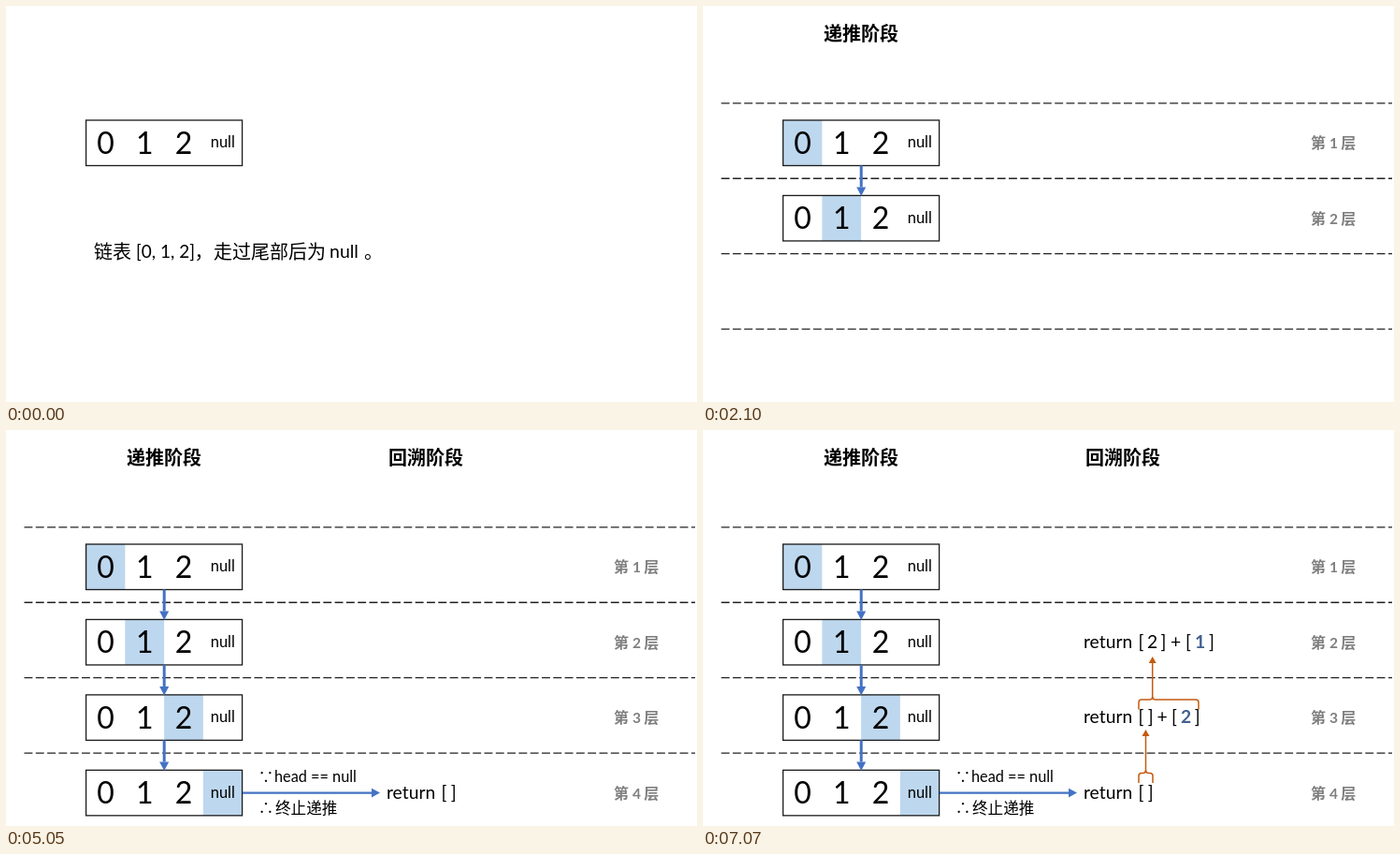
Animation, 739 px wide and 423 px high, one loop 8000 ms. Source, as an HTML page:

```html
<!DOCTYPE html>
<html lang="zh-CN">
<head>
<meta charset="utf-8">
<style>
  html, body { margin: 0; width: 100%; height: 100%; overflow: hidden; background: #fff; }
  svg { display: block; width: 739px; height: 423px; }
  text { font-family: Lato, "Noto Sans CJK SC", "Noto Sans CJK", sans-serif; white-space: pre; }
  .mid { text-anchor: middle; }
  .bold { font-weight: 700; }
</style>
</head>
<body>
<svg id="stage" viewBox="0 0 739 423"></svg>
<script>
const LOOP = 8000;
const PITCH = 80.45;
const BLUE = '#4472c4', ORANGE = '#c55a11', CELL = '#bdd7ee', INK = '#000';
const stage = document.getElementById('stage');
const scenes = [];

function add(parent, tag, attrs, content) {
  const el = document.createElementNS('http://www.w3.org/2000/svg', tag);
  for (const key in attrs) el.setAttribute(key, attrs[key]);
  if (content) el.textContent = content;
  parent.appendChild(el);
  return el;
}

// A group visible from start until end within the loop.
function scene(start, end = LOOP) {
  const el = add(stage, 'g', {});
  scenes.push({ el, start, end });
  return el;
}

function text(g, x, y, size, content, cls = '', fill = INK) {
  add(g, 'text', { x, y, 'font-size': size, class: cls, fill }, content);
}

function line(g, x1, y1, x2, y2, stroke, width, dash = 'none') {
  add(g, 'line', { x1, y1, x2, y2, stroke, 'stroke-width': width, 'stroke-dasharray': dash });
}

function arrow(g, x1, y1, x2, y2, color, width, length, half) {
  const span = Math.hypot(x2 - x1, y2 - y1);
  const dx = (x2 - x1) / span, dy = (y2 - y1) / span;
  const bx = x2 - dx * length, by = y2 - dy * length;
  line(g, x1, y1, bx, by, color, width);
  add(g, 'path', {
    d: `M${x2},${y2} L${bx - dy * half},${by + dx * half} L${bx + dy * half},${by - dx * half} Z`,
    fill: color
  });
}

function brace(g, left, right, peak, top, bottom) {
  const r = Math.min(3, (peak - left) / 2.5);
  add(g, 'path', {
    d: `M${left},${bottom} V${top + r} Q${left},${top} ${left + r},${top} H${peak - r}
        Q${peak},${top} ${peak},${top - r} Q${peak},${top} ${peak + r},${top}
        H${right - r} Q${right},${top} ${right},${top + r} V${bottom}`,
    fill: 'none', stroke: ORANGE, 'stroke-width': 1.5
  });
}

function highlight(g, row) {
  add(g, 'rect', { x: 85.6 + row * 41.75, y: 122 + row * PITCH, width: 41.75, height: 48.5, fill: CELL });
}

function listBox(g, row) {
  const y = row * PITCH;
  add(g, 'rect', {
    x: 85.6, y: 122 + y, width: 167, height: 48.5,
    fill: 'none', stroke: '#1a1a1a', 'stroke-width': 1.3
  });
  ['0', '1', '2'].forEach((d, i) => text(g, 106.6 + i * 41.7, 158 + y, 32, d, 'mid'));
  text(g, 231.8, 151.3 + y, 16.5, 'null', 'mid');
}

function label(g, row) {
  const y = 152.3 + row * PITCH;
  text(g, 658, y, 16, '第', 'mid bold', '#7f7f7f');
  text(g, 674.5, y, 15.5, String(row + 1), 'mid bold', '#7f7f7f');
  text(g, 690.3, y, 16, '层', 'mid bold', '#7f7f7f');
}

function descend(g, row) {
  const y = 122 + row * PITCH;
  arrow(g, 169.2, y - 32, 169.2, y + 0.6, BLUE, 3, 9.5, 5);
}

// Parts alternate between a symbol and its centre.
function result(g, row, parts, fresh) {
  const y = 152.5 + row * PITCH;
  text(g, 407, y, 19.3, 'return');
  for (const [symbol, x] of parts) text(g, x, y, 19.3, symbol, 'mid');
  if (fresh) text(g, fresh[1], y, 19.3, fresh[0], 'mid bold', '#42608f');
}

const intro = scene(0, 1090);
text(intro, 94, 270, 20, '链表');
text(intro, 139, 269, 19, '[0, 1, 2]');
text(intro, 201.5, 270, 20, '，');
text(intro, 222, 270, 20, '走过尾部后为');
text(intro, 346, 269, 19.5, 'null');
text(intro, 383, 270, 20, '。');

const first = scene(1090);
text(first, 129, 36.7, 20, '递推阶段', 'bold');
for (let i = 0; i < 4; i++) {
  const y = 103.8 + i * PITCH;
  line(first, 19.5, y, 737, y, '#222', 1.3, '8.9 3.4');
}
highlight(first, 0);
label(first, 0);
listBox(scene(0), 0);

[2100, 3030, 4040].forEach((start, i) => {
  const g = scene(start), row = i + 1;
  highlight(g, row);
  listBox(g, row);
  label(g, row);
  descend(g, row);
});

const stop = scene(5050);
text(stop, 409, 36.7, 20, '回溯阶段', 'bold');
arrow(stop, 253, 387.6, 400, 387.6, BLUE, 2.3, 9, 4.8);
text(stop, 278, 377, 16.5, '∵', 'mid');
text(stop, 287, 376.3, 16.3, 'head == null');
text(stop, 278, 410, 16.5, '∴', 'mid');
text(stop, 288, 410.3, 16.6, '终止递推');
result(stop, 3, [['[', 468.5], [']', 478.7]]);

const third = scene(6060);
brace(third, 466, 481, 473.5, 366.5, 377);
arrow(third, 473.5, 365, 473.5, 320, ORANGE, 1.5, 7, 4);
result(third, 2, [['[', 468.5], [']', 478.7], ['+', 491], ['[', 504], [']', 528.7]], ['2', 516.5]);

const second = scene(7070);
brace(second, 466, 530, 480.7, 288, 298.5);
arrow(second, 480.7, 286, 480.7, 242, ORANGE, 1.5, 7, 4);
result(second, 1, [['[', 468.5], ['2', 480.5], [']', 492.5], ['+', 505.5], ['[', 519], [']', 544]], ['1', 531.5]);

function draw() {
  const t = performance.now() % LOOP;
  for (const { el, start, end } of scenes) {
    el.style.display = t >= start && t < end ? '' : 'none';
  }
  requestAnimationFrame(draw);
}
draw();
</script>
</body>
</html>
```
